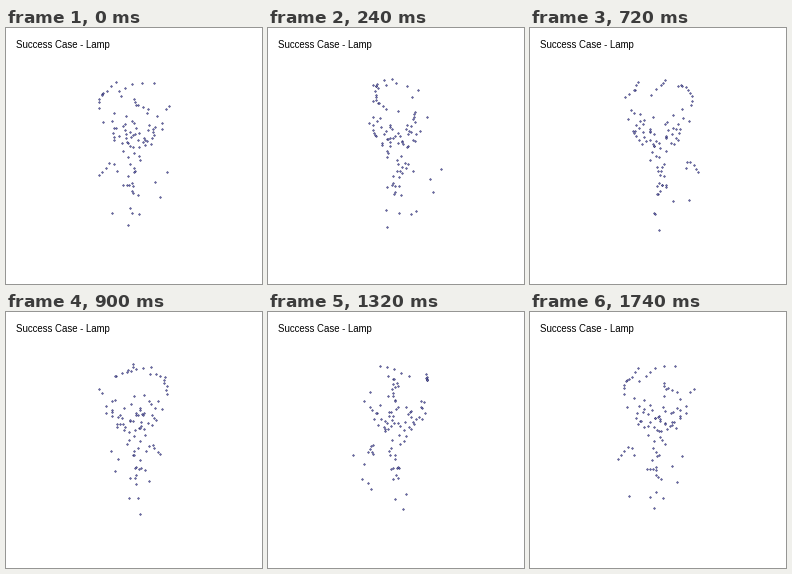
Animation, 256 px wide and 256 px high, one loop 1.8 s. Source, as a matplotlib script:

```python
import numpy as np
import matplotlib.pyplot as plt
from matplotlib.animation import FuncAnimation

SIZE, DPI = 256, 100
FRAMES, STEP = 30, 60
MID = 128        # optical centre, px
DIST = 200       # camera distance, px
GOLDEN = np.pi * (3 - np.sqrt(5))

rng = np.random.default_rng(7)


def stroke(n, jitter, *keys):
    """n points spread evenly along a line through the keys (x, down, near)."""
    t = np.linspace(0, 1, n)
    knots = np.linspace(0, 1, len(keys))
    line = np.column_stack([np.interp(t, knots, c) for c in zip(*keys)])
    return line + rng.normal(0, jitter, line.shape)


def bowl(n, top, height, radius, inner):
    """Points scattered in a shell that narrows downwards."""
    u = (np.arange(n) + rng.random(n)) / n
    turn = np.arange(n) * GOLDEN + rng.normal(0, 0.4, n)
    r = radius * np.sqrt(1 - 0.8 * u ** 2) * rng.uniform(inner, 1, n)
    return np.column_stack([r * np.cos(turn), top + height * u, r * np.sin(turn)])


cloud = np.vstack([
    # crown
    stroke(9, 0.7, (-17, -70, 11), (-30, -64, -1), (-32, -57, 9), (-34, -47, 6)),
    stroke(5, 0.5, (19, -68, 13), (-2, -72, 3), (-16, -69, -12)),
    stroke(6, 1.2, (2, -65, -31), (4, -60, -31), (15, -56, -29)),
    stroke(2, 0, (35, -50, -2), (32, -47, -1)),
    stroke(1, 0, (-11, -51, 29)),
    # shade
    bowl(38, -40, 30, 32, 0.7),
    bowl(15, -28, 36, 17, 0.4),
    # legs and stem
    stroke(6, 0.7, (-29, 17, 31), (-25, 11, 31), (-19, 4, 28), (-15, 13, 32)),
    stroke(3, 0, (27, 13, 35), (18, 22, 28), (22, 35, 29)),
    stroke(2, 0, (-18, 48, 33), (-2, 50, 26)),
    stroke(12, 3, (0, 11, 5), (-4, 28, -2), (1, 36, 1)),
    stroke(3, 0, (5, 58, 0), (-4, 55, -10), (-6, 71, -7)),
])


def project(i):
    a = 2 * np.pi * i / FRAMES
    x, y, z = cloud.T
    rx = x * np.cos(a) + z * np.sin(a)
    rz = z * np.cos(a) - x * np.sin(a)
    scale = DIST / (DIST - rz)
    return np.column_stack([rx * scale, y * scale]) + MID


fig = plt.figure(figsize=(SIZE / DPI, SIZE / DPI), dpi=DPI, facecolor="white")
ax = fig.add_axes([0, 0, 1, 1])
ax.set_xlim(0, SIZE)
ax.set_ylim(SIZE, 0)
ax.axis("off")

ax.text(10, 20, "Success Case - Lamp", family="Liberation Sans", size=6.95,
        color="black", va="baseline")
dots = ax.scatter(*project(0).T, s=1.1, c="#9a9ae0",
                  edgecolors="#101050", linewidths=0.4)


def draw(i):
    dots.set_offsets(project(i))
    return (dots,)


anim = FuncAnimation(fig, draw, frames=FRAMES, interval=STEP,
                     repeat=True, repeat_delay=0)
plt.show()
```
